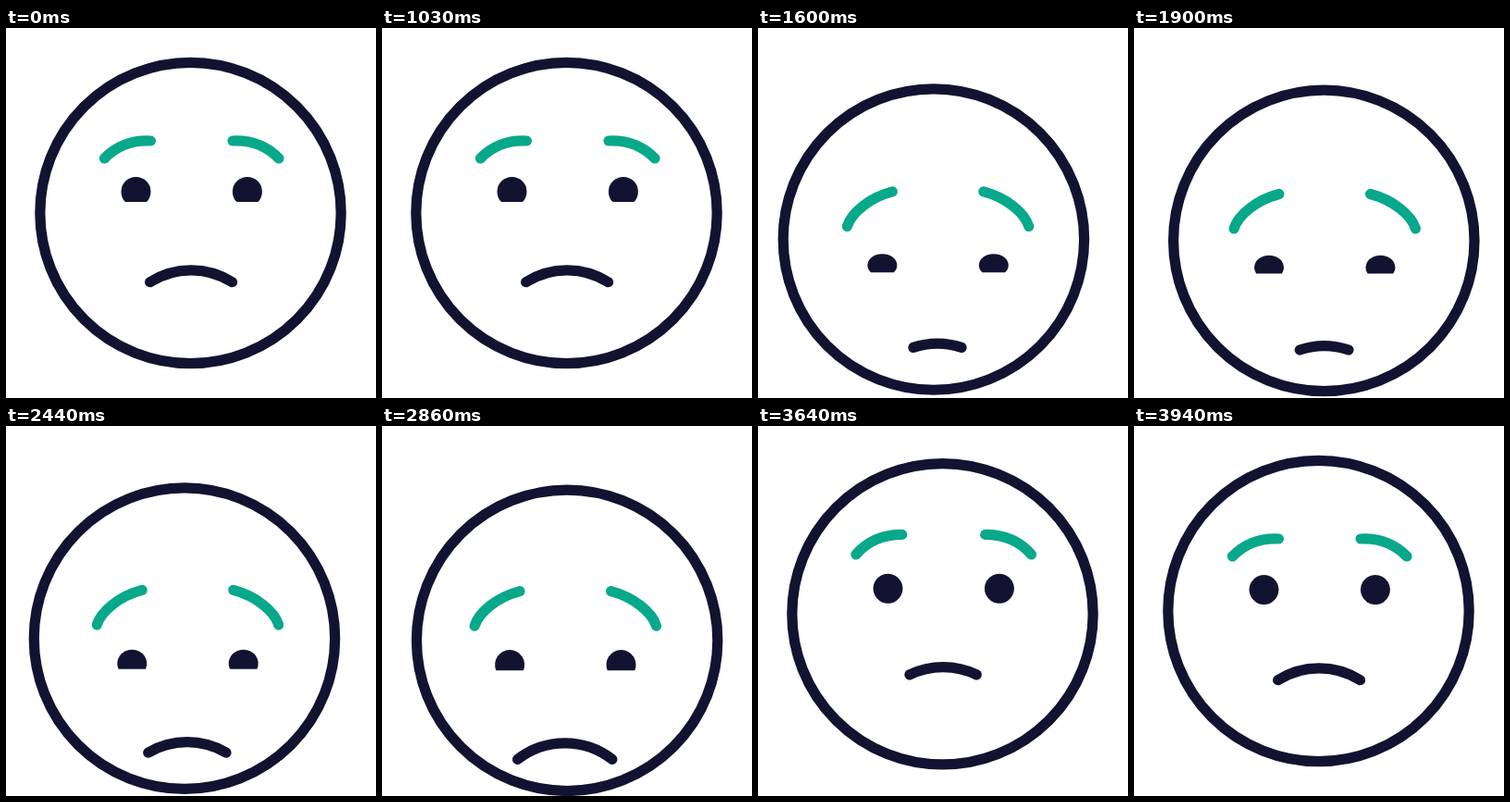
Write an HTML page that moves like this. It is 400 px wide and 400 px high and loops after 3970 ms.

```html
<!DOCTYPE html>
<html lang="en">
<head>
<meta charset="utf-8">
<title>Worried face</title>
<style>
  html, body { margin: 0; width: 100%; height: 100%; overflow: hidden; background: #fff; }
  svg { display: block; width: 100vw; height: 100vh; }
  .line { fill: none; stroke: #121331; stroke-width: 11.2; stroke-linecap: round; }
  .brow { stroke: #08a88a; }
  .eye { fill: #121331; }
</style>
</head>
<body>
<svg viewBox="0 0 400 400">
  <circle id="head" class="line" r="162.7"/>
  <path id="browL" class="line brow"/>
  <path id="browR" class="line brow"/>
  <path id="eyeL" class="eye"/>
  <path id="eyeR" class="eye"/>
  <path id="mouth" class="line"/>
</svg>
<script>
const LOOP = 3970, REST = 1030, STEP = 30;
const EYE_GAP = 60.2, EYE_R = 16, MOUTH_DROP = 84.8, MOUTH_R = 83.5;

// 0 before a, 1 after b, eased between
function ease(t, a, b) {
  const u = Math.min(1, Math.max(0, (t - a) / (b - a)));
  return (1 - Math.cos(Math.PI * u)) / 2;
}

// Lift a little, sink, spring back up past the start, settle
function nod(t, rise, drop, rebound) {
  const fall = rise + drop;
  return -rise * ease(t, REST, 1156)
    + fall * (ease(t, 1156, 1456) - ease(t, 3150, 3465))
    + (rise + rebound) * ease(t, 3465, 3690)
    - rebound * ease(t, 3690, 3880);
}

// Shake from side to side, fading in and out
function sway(t, centre, half, lag) {
  const fade = ease(t - lag, 1200, 1500) - ease(t - lag, 3100, 3350);
  return Math.sin(Math.PI * (t - centre) / half) * fade;
}

// Offsets from the middle of the face, mixed from a calm to a sad curve
function brow(x, y, sad, side) {
  const point = (dx, dy, sadX, sadY) =>
    `${x + side * (dx + (sadX - dx) * sad)} ${y + dy + (sadY - dy) * sad}`;
  return `M${point(94.3, -36, 98.2, -42)}C${point(81.7, -49, 93.4, -57.2)} ` +
    `${point(64.7, -56, 73.4, -73.2)} ${point(44.3, -55, 49.3, -79.5)}`;
}

// Ellipse cut flat by the lower lid; lid is the share left under the centre
function eye(x, y, h, lid) {
  const half = EYE_R * Math.sqrt(1 - lid * lid), base = y + h * lid;
  return `M${x - half} ${base}A${EYE_R} ${h} 0 1 1 ${x + half} ${base}Z`;
}

// Part of a fixed circle, w to each side of its top
function mouth(x, y, w) {
  const end = y + MOUTH_R - Math.sqrt(MOUTH_R ** 2 - w * w);
  return `M${x - w} ${end}A${MOUTH_R} ${MOUTH_R} 0 0 1 ${x + w} ${end}`;
}

const set = (id, name, value) => document.getElementById(id).setAttribute(name, value);

function draw(t) {
  const headSway = sway(t, 1800, 525, 0);
  set("head", "cx", 199.5 + 10.3 * headSway);
  set("head", "cy", 200 + nod(t, 10, 32, 5) - 3.7 * Math.abs(headSway));

  // The features trail behind the head
  const x = 200.7 + 8 * sway(t, 1760, 578, 70);
  const y = 177 + nod(t - 37, 12, 81, 4) + 1.7 * headSway;
  const sad = ease(t, REST, 1310) - ease(t, 3390, 3720);
  const eyeH = EYE_R - 4 * (ease(t, REST, 1330) - ease(t, 1330, 2900));
  const lid = 0.69 - 0.3 * ease(t, 1330, 2300) + 0.605 * ease(t, 3170, 3630);
  const width = 44.5 - 18.7 * ease(t, REST, 1650) + 25.4 * ease(t, 1800, 2880)
    - 20 * ease(t, 2880, 3480) + 13.3 * ease(t, 3480, 3860);

  for (const [name, side] of [["L", -1], ["R", 1]]) {
    set("brow" + name, "d", brow(x, y, sad, side));
    set("eye" + name, "d", eye(x + side * EYE_GAP, y, eyeH, lid));
  }
  set("mouth", "d", mouth(x - 0.6, y + MOUTH_DROP, width));
}

const start = performance.now();
function tick() {
  const t = (performance.now() - start) % LOOP;
  draw(t < REST ? 0 : REST + Math.floor((t - REST) / STEP) * STEP);
  requestAnimationFrame(tick);
}
tick();
</script>
</body>
</html>
```
